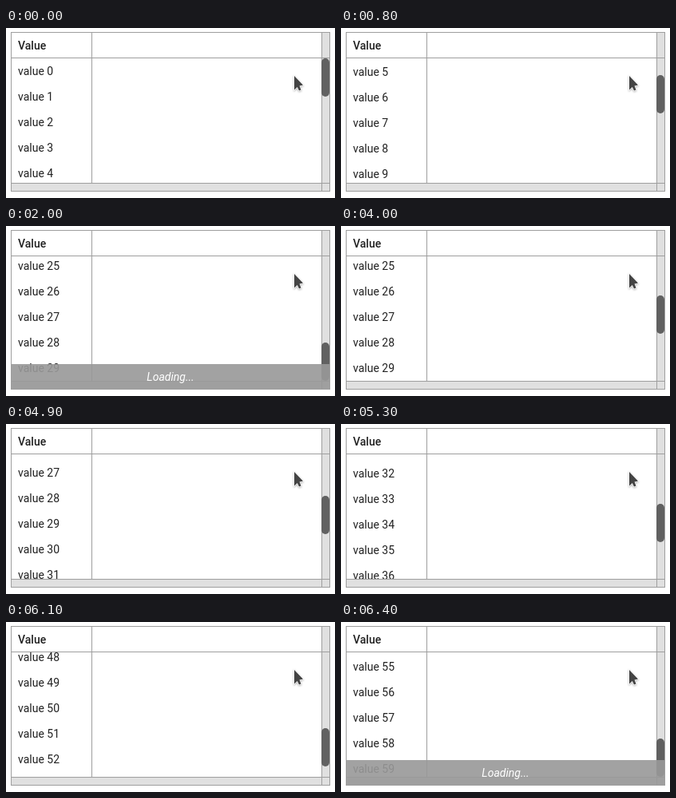
Recreate the animation shown at these times as an HTML page. Size 412x213 px, loop 8 s.

```html
<!DOCTYPE html>
<html lang="en">
<head>
<meta charset="utf-8">
<title>Scrolling list</title>
<style>
html, body { margin: 0; width: 100%; height: 100%; overflow: hidden; background: #fff; }
body { position: relative; font: 14px/32px Roboto, sans-serif; color: #212121; }
body *, svg { position: absolute; box-sizing: border-box; }
#grid { left: 6px; top: 5px; width: 400px; height: 200px; border: 1px solid #9e9e9e; overflow: hidden; }
#head { left: 8px; top: 0; font-weight: 500; }
#view { left: 0; top: 32px; width: 388px; height: 156px; overflow: hidden; }
#view div { left: 8px; white-space: pre; }
#right { left: 388px; top: 0; width: 10px; height: 198px; background: #e0e0e0; border-left: 1px solid #9e9e9e; }
#bottom { left: 0; top: 188px; width: 398px; height: 10px; background: #e0e0e0; border-top: 1px solid #9e9e9e; }
.line { background: #9e9e9e; }
#thumb { left: 388px; width: 10px; height: 48px; border-radius: 5px; background: #616161; }
#load { left: 0; top: 167px; width: 398px; height: 32px; background: #999; opacity: .9;
  color: #fff; font-style: italic; text-align: center; }
</style>
</head>
<body>
<div id="grid">
  <div id="head">Value</div>
  <div id="view"></div>
  <div id="bottom"></div>
  <div id="right"></div>
  <div class="line" style="left:0;top:31px;width:398px;height:1px"></div>
  <div class="line" style="left:100px;top:0;width:1px;height:188px"></div>
  <div class="line" style="left:388px;top:188px;width:10px;height:1px"></div>
  <div id="thumb"></div>
  <div id="load">Loading...</div>
</div>
<svg width="412" height="213" style="left:0;top:0">
  <path d="M361 60L372 71.5L367.5 72.5L369.5 77.5L367 78.5L364.8 74L361 77.5Z"
    fill="#444" stroke="#fff" stroke-width="1.4" paint-order="stroke"
    style="filter:drop-shadow(0 1px 1px rgba(0,0,0,.3))"/>
</svg>
<script>
const ROW = 32, VIEW = 156, THUMB = 48, TICK = 53, LOOP = 8000;
const firstMax = 30 * ROW - VIEW;

// [time, wheel ticks turned so far] for each page of rows
const firstPage = [[400, 1], [500, 2], [800, 3], [900, 5], [1000, 8], [1200, 9],
  [1300, 10], [1600, 12], [1700, 14], [2000, 16]];
const secondPage = [[4900, 1], [5000, 2], [5300, 4], [5400, 6], [5600, 7],
  [5700, 10], [6000, 12], [6100, 14], [6300, 16], [6400, 18]];

const $ = id => document.getElementById(id);
const rows = Array.from({ length: 6 }, () => $('view').appendChild(document.createElement('div')));
const ticksAt = (steps, t) => steps.reduce((n, [at, ticks]) => t >= at ? ticks : n, 0);

function draw(t) {
  const grown = t >= 4000;
  const max = (grown ? 60 : 30) * ROW - VIEW;
  const scroll = grown
    ? Math.min(max, firstMax + TICK * ticksAt(secondPage, t))
    : Math.min(max, TICK * ticksAt(firstPage, t));
  const first = Math.floor(scroll / ROW);
  rows.forEach((row, i) => {
    const text = 'value ' + (first + i);
    if (row.textContent !== text) row.textContent = text;
    row.style.top = (first + i) * ROW - scroll + 'px';
  });
  $('thumb').style.top = 32 + (VIEW - THUMB) * scroll / max + 'px';
  const loading = t >= 2000 && t < 4000 || t >= 6400;
  $('load').style.display = loading ? 'block' : 'none';
}

const start = performance.now();
function frame() {
  draw((performance.now() - start) % LOOP);
  requestAnimationFrame(frame);
}
frame();
</script>
</body>
</html>
```
